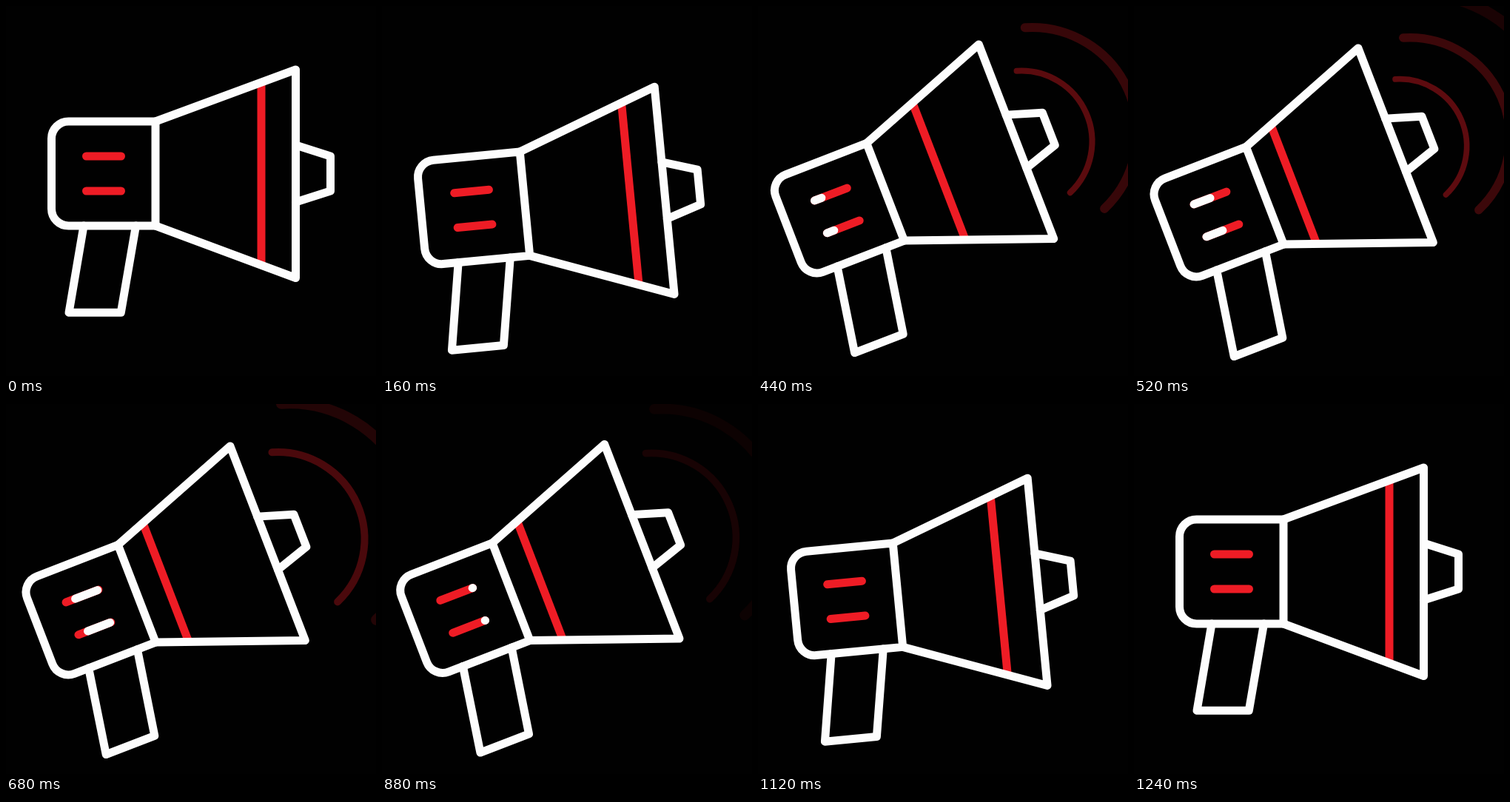
An HTML page that plays this animation: 500x500 px, repeating every 1.48 s.

```html
<!DOCTYPE html>
<html lang="en">
<head>
<meta charset="utf-8">
<title>Megaphone</title>
<style>
  html, body { margin: 0; width: 100%; height: 100%; overflow: hidden; background: #010101; }
  svg { display: block; width: 100%; height: 100%; }
  .ink { fill: none; stroke: #fdfdfd; stroke-width: 11; stroke-linecap: round; stroke-linejoin: round; }
  .red { stroke: #ee1c25; }
  .wave { stroke-width: 7; }
</style>
</head>
<body>
<svg viewBox="0 0 500 500">
  <g id="horn" class="ink">
    <g id="waves"></g>
    <path id="bar" class="red" stroke-linecap="butt"/>
    <path d="M105 297 85 414.3H155.3L175.5 297"/>
    <path d="M391.5 188 438.5 203V250L391.5 265"/>
    <path d="M202 156H84.5a23 23 0 0 0-23 23V274a23 23 0 0 0 23 23H202Z"/>
    <path d="M202 156 391.5 86V367.5L202 297"/>
    <path class="red" d="M108.5 203H155.5M108.5 250H155.5"/>
    <path id="fill"/>
  </g>
</svg>
<script>
const LOOP = 1480, STEP = 40, TILT = 21.1;
const IN = 80, UP = 320, OUT = 880, REST = 1240;
const births = [316, 410, 500, 606, 716, 812];

// offsets of the swing, one per step
const raise = {
  x: [0, -2, -7, -13, -18.5, -21.5, -22.3],
  y: [0, 15, 36, 41, 30, 16, 8.4]
};
const lower = {
  x: [-22.3, -28, -34.5, -30, -22, -15.5, -11, -7, -3.5, 0],
  y: [8.4, 12, 20, 29, 36, 36, 27, 14, 4, 0]
};

const $ = id => document.getElementById(id);
const clamp = v => Math.min(1, Math.max(0, v));
const ramp = (t, a, b) => clamp((t - a) / (b - a));
const ease = (t, a, b) => { const p = ramp(t, a, b); return p * p * (3 - 2 * p); };

const waves = births.map(() => {
  const el = document.createElementNS('http://www.w3.org/2000/svg', 'path');
  el.setAttribute('class', 'red wave');
  el.setAttribute('d', 'M55.8-89.5A82.4 82.4 0 0 1 62.8 65.3');
  $('waves').append(el);
  return el;
});

function offset(t) {
  if (t <= IN || t >= REST) return [0, 0];
  if (t < UP) { const i = (t - IN) / STEP; return [raise.x[i], raise.y[i]]; }
  if (t > OUT) { const i = (t - OUT) / STEP; return [lower.x[i], lower.y[i]]; }
  const shake = Math.sin((t - UP) / 160 * 2 * Math.PI);
  return [-22.3 + 2.3 * shake, 8.4 + 2.5 * shake];
}

function draw(t) {
  const [x, y] = offset(t);
  const angle = -TILT * (ease(t, IN, UP) - ease(t, OUT, REST));
  $('horn').setAttribute('transform', `translate(${x} ${y}) rotate(${angle} 250 250)`);

  const bx = 345 - 101 * (ease(t, UP, 520) - ease(t, OUT, 1160));
  const half = 70.5 + (bx - 202) * 0.3707;
  $('bar').setAttribute('d', `M${bx} ${226.7 - half}V${226.7 + half}`);

  const a = 108.5 + 47 * ease(t, 560, 900);
  const b = 108.5 + 47 * ease(t, UP, 720);
  const lit = t > UP && t < 900;
  $('fill').setAttribute('d', lit ? `M${a} 203H${b}M${a} 250H${b}` : '');

  const level = ramp(t, 300, 360) * (1 - ramp(t, 820, 905));
  waves.forEach((el, i) => {
    const age = t - births[i];
    const alpha = age < 0 ? 0 : 0.42 * clamp(1 - age / 270) * level;
    el.setAttribute('opacity', alpha);
    el.setAttribute('transform', `translate(361.7 241.6) scale(${0.98 + 0.006 * Math.max(0, age)})`);
  });
}

const start = performance.now();
function tick() {
  const t = (performance.now() - start) % LOOP;
  draw(Math.floor(t / STEP) * STEP);
  requestAnimationFrame(tick);
}
tick();
</script>
</body>
</html>
```
